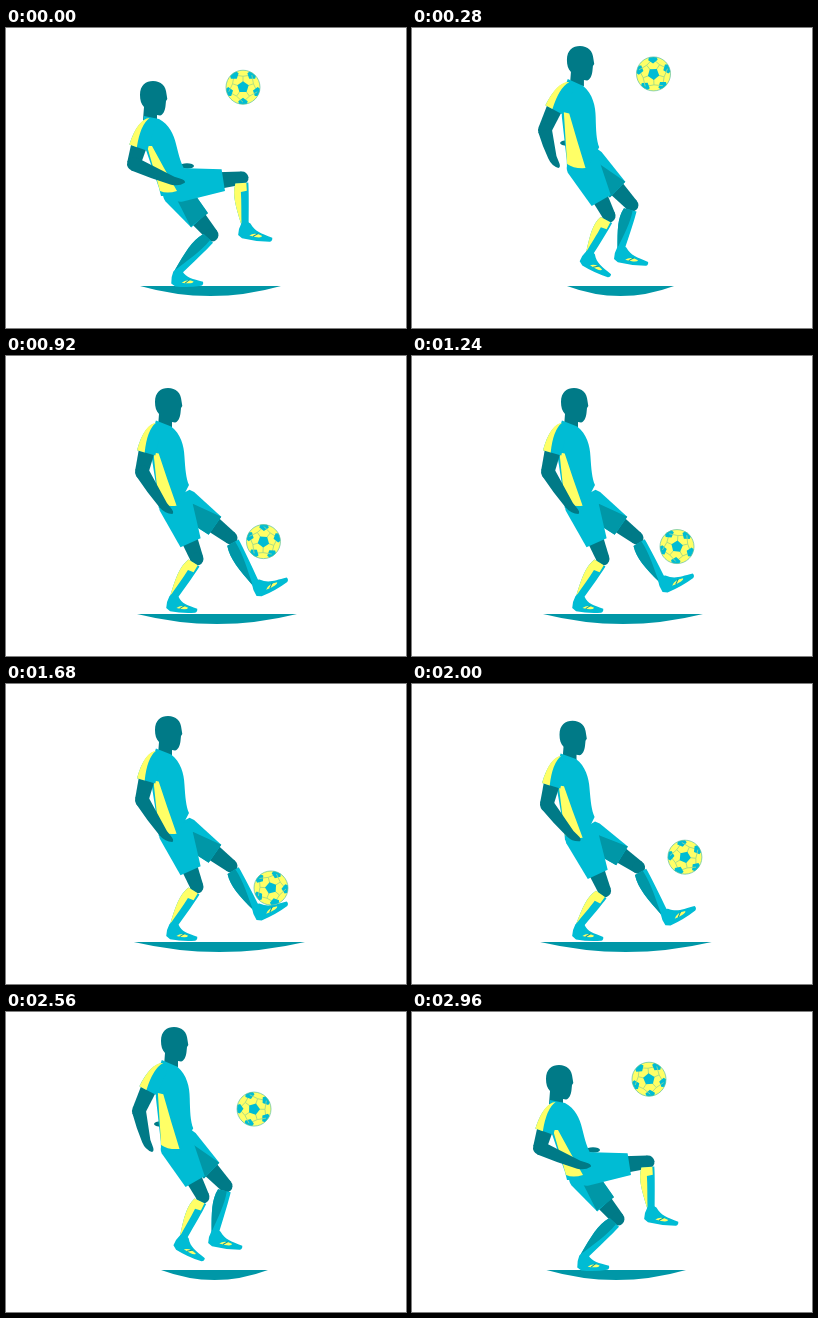
These frames come from a looping animation (400x300 px, 3 s). An HTML page with a canvas:

```html
<!DOCTYPE html>
<html lang="en">
<head>
<meta charset="utf-8">
<title>Juggling</title>
<style>
html, body { margin: 0; width: 100%; height: 100%; overflow: hidden; background: #fff; }
canvas { display: block; width: 400px; height: 300px; }
</style>
</head>
<body>
<canvas id="stage" width="400" height="300"></canvas>
<script>
const c = document.getElementById('stage').getContext('2d');
const LOOP = 3000, STEP = 40, G = 0.00095;
const SKIN = '#007a87', CYAN = '#00bcd4', DARK = '#0097a7', YELLOW = '#ffff66';

// Joints of each pose; limbs run hip, knee, ankle, toe.
const poses = {
  knee: {
    head: [147, 68], neck: [146, 90], hip: [168, 160], arm: [138, 102, 128, 136, 167, 152],
    near: [172, 157, 236, 150, 239, 197, 265, 212], far: [169, 163, 206, 207, 171, 245, 196, 256],
    hand: [181, 138], shadow: [134, 275], rim: [-1]
  },
  crouch: {
    head: [147, 67], neck: [146, 89], hip: [169, 160], arm: [138, 101, 128, 135, 167, 152],
    near: [170, 158, 206, 212, 166, 243, 190, 256], far: [178, 157, 239, 166, 240, 214, 270, 222],
    hand: [181, 138], shadow: [137, 270], rim: [1]
  },
  stand: {
    head: [162, 47], neck: [158, 68], hip: [168, 146], arm: [145, 79, 136, 116, 158, 149],
    near: [169, 147, 191, 203, 167, 242, 190, 255], far: [178, 146, 225, 182, 250, 224, 281, 220],
    hand: [162, 125], shadow: [131, 291], rim: [1]
  },
  kick: {
    head: [147, 68], neck: [145, 90], hip: [168, 160], arm: [137, 102, 125, 135, 166, 152],
    near: [171, 159, 207, 213, 166, 243, 190, 256], far: [179, 158, 241, 168, 276, 207, 301, 196],
    hand: [165, 138], shadow: [131, 306], rim: [1]
  },
  hop: {
    head: [168, 30], neck: [164, 52], hip: [171, 133], arm: [150, 62, 133, 99, 141, 129],
    near: [170, 132, 197, 185, 177, 226, 197, 248], far: [178, 129, 220, 174, 209, 221, 235, 236],
    hand: [155, 112], shadow: [155, 262], rim: [1]
  }
};

// time, pose, body lift, far foot drop, extra shadow width
const keys = [
  [0, 'knee', 0, 0, 0], [290, 'hop', -3, 0, 0], [560, 'crouch', 0, 0, 0],
  [774, 'stand', 0, 0, 0], [980, 'stand', 0, 5, 0], [1180, 'stand', 0, -1, 0],
  [1240, 'stand', 0, 0, 0], [1440, 'stand', 0, 5, 4], [1680, 'stand', 0, 0, 8],
  [1950, 'stand', -3, 6, 8], [2207, 'kick', 0, 15, 0], [2280, 'kick', 0, 0, 0],
  [2560, 'hop', 0, 0, 0], [2840, 'knee', 18, 0, -20], [2960, 'knee', 0, 0, -1], [3000, 'knee', 0, 0, 0]
];

const bounces = [[-150, 97], [774, 204], [1180, 203], [1680, 204], [2207, 205], [2850, 97], [3774, 204]];
const ballX = [[0, 237], [560, 246], [774, 254], [1240, 265], [1680, 265], [2207, 278],
  [2280, 277], [2560, 248], [2850, 238], [2960, 237], [3000, 237]];

const mix = (a, b, u) => a + (b - a) * u;

function span(list, t) {
  let i = 0;
  while (i < list.length - 2 && t >= list[i + 1][0]) i++;
  const a = list[i], b = list[i + 1];
  return [a, b, (t - a[0]) / (b[0] - a[0])];
}

function poseAt(t) {
  const [a, b, r] = span(keys, t), u = r * r * (3 - 2 * r);
  const p = {};
  for (const part in poses.knee) {
    p[part] = poses[a[1]][part].map((v, i) => mix(v, poses[b[1]][part][i], u));
  }
  const lift = mix(a[2], b[2], u), drop = mix(a[3], b[3], u), wide = mix(a[4], b[4], u);
  for (const part of ['head', 'neck', 'hip', 'arm', 'near', 'far', 'hand']) {
    // A low body only bends the knees: planted feet stay put.
    p[part] = p[part].map((v, i) => i % 2 && !(lift < 0 && i > 4) ? v - lift : v);
  }
  p.far[5] += drop;
  p.far[7] += drop;
  p.shadow[0] -= wide * 0.4;
  p.shadow[1] += wide;
  return p;
}

function fill(color, d) {
  c.fillStyle = color;
  c.fill(new Path2D(d));
}

function dot(color, x, y, rx, ry = rx) {
  c.fillStyle = color;
  c.beginPath();
  c.ellipse(x, y, rx, ry, 0, 0, 7);
  c.fill();
}

// Draws with the x axis running from the first point to the second.
function along(x1, y1, x2, y2, draw) {
  c.save();
  c.translate(x1, y1);
  c.rotate(Math.atan2(y2 - y1, x2 - x1));
  draw(Math.hypot(x2 - x1, y2 - y1));
  c.restore();
}

function leg([hx, hy, kx, ky, ax, ay, tx, ty], far, rim) {
  along(hx, hy, kx, ky, L => {
    fill(SKIN, `M${L * .5},-9L${L},-6.5L${L},6.5L${L * .5},9Z`);
    dot(SKIN, L, 0, 6.5);
  });
  along(kx, ky, ax, ay, L => {
    const back = `C${L * .35},11 ${L * .6},8 ${L},3.5`;
    fill(CYAN, `M5,7${back}L${L + 2},-3.5C${L * .6},-5 ${L * .3},-6 5,-6Z`);
    if (far) fill(DARK, `M5,7${back}C${L * .7},1 ${L * .4},-3 5,-2Z`);
    else fill(YELLOW, `M5,7${back}C${L * .75},3 ${L * .5},2 14,2L13,-4L5,-4Z`);
  });
  along(ax, ay, tx, ty, L => {
    fill(CYAN, `M-4,0L-2,-4L4,-4C${L * .4},1 ${L * .6},-1 ${L},-2.5Q${L + 2},0 ${L},2` +
      `Q${L * .6},9 4,13L-1,12Q-4,6 -4,0Z`);
    fill(YELLOW, `M${L * .3},7Q${L * .4},1 ${L * .68},1Q${L * .7},4 ${L * .3},7Z`);
    c.strokeStyle = DARK;
    c.lineWidth = 1;
    c.stroke(new Path2D(`M${L * .42},6L${L * .52},1`));
  });
  along(hx, hy, kx, ky, L => {
    const hem = L * (far ? .65 : .7), w = far ? 14 : 17;
    fill(CYAN, `M-3,${-w + 1}L2,${-w}L${hem},-11L${hem + 1},11L2,${w}Q-8,${w} -9,0Z`);
    if (far) {
      const s = rim < 0 ? -1 : 1;
      fill(DARK, `M8,${-4 * s}L${hem},${-11 * s}L${hem + 1},${11 * s}L4,${14 * s}Z`);
    }
  });
}

function head([x, y]) {
  c.save();
  c.translate(x, y);
  fill(SKIN, 'M-13,-1C-13,-11 -7,-15 0,-15C8,-15 13,-10 13.5,-2L14.3,3L13,5L12.5,10' +
    'C12,15 10,19 7,19.5L4,19L4,25L-10,24L-9,11C-12,8 -13,4 -13,-1Z');
  c.restore();
}

function torso([nx, ny], [hx, hy]) {
  const dx = hx - nx, dy = hy - ny, size = Math.hypot(dx, dy) / Math.hypot(22, 70);
  c.save();
  c.translate(nx, ny);
  c.rotate(Math.atan2(dy, dx) - Math.atan2(70, 22));
  c.scale(size, size);
  fill(CYAN, 'M-8,-2L7,1C17,6 22,17 24,26C27,38 29,46 33,52L25,78L9,78L7,70L-6,32L-10,12Z');
  fill(YELLOW, 'M-5,28L0,28L12,50L25,73Q15,76 8,73Z');
  c.restore();
}

function arm([sx, sy, ex, ey, wx, wy]) {
  along(sx, sy, ex, ey, L => {
    fill(SKIN, `M8,-8L${L},-6.5L${L},7L8,9Z`);
    dot(SKIN, L, 0, 7);
  });
  along(ex, ey, wx, wy, L => {
    fill(SKIN, `M0,-7L${L},-3.5L${L + 5},-4Q${L + 12},-5 ${L + 12},-2Q${L + 8},4 ${L},5Q${L * .5},7 0,7Z`);
  });
  along(sx, sy, ex, ey, () => {
    fill(CYAN, 'M-13,-3Q-9,9 18,10L19,-9L-6,-9Z');
    fill(YELLOW, 'M-13,-2Q-9,9 18,10L18.5,2Q-4,5 -13,-2Z');
  });
}

function pentagon(x, y, r, turn) {
  c.beginPath();
  for (let i = 0; i < 5; i++) {
    const a = turn + i * Math.PI * 0.4;
    c.lineTo(x + r * Math.cos(a), y + r * Math.sin(a));
  }
  c.closePath();
  c.fill();
}

function ball(t) {
  const [a, b, u] = span(bounces, t), T = b[0] - a[0];
  const y = mix(a[1], b[1], u) - G / 2 * T * T * u * (1 - u);
  const [p, q, v] = span(ballX, t);
  c.save();
  c.translate(mix(p[1], q[1], v), y);
  dot(YELLOW, 0, 0, 17);
  c.beginPath();
  c.arc(0, 0, 17, 0, 7);
  c.clip();
  c.rotate(t / LOOP * Math.PI * 2);
  c.fillStyle = DARK;
  c.strokeStyle = '#9fd98a';
  c.lineWidth = 0.8;
  for (let i = 0; i < 5; i++) {
    const k = i * Math.PI * 0.4 - Math.PI / 2, m = k + Math.PI / 5;
    const fx = 11 * Math.cos(k), fy = 11 * Math.sin(k);
    c.beginPath();
    c.moveTo(5 * Math.cos(k), 5 * Math.sin(k));
    c.lineTo(fx, fy);
    c.lineTo(15 * Math.cos(m), 15 * Math.sin(m));
    c.moveTo(fx, fy);
    c.lineTo(15 * Math.cos(k - Math.PI / 5), 15 * Math.sin(k - Math.PI / 5));
    c.stroke();
    c.fillStyle = CYAN;
    pentagon(15.5 * Math.cos(m), 15.5 * Math.sin(m), 5, m + Math.PI);
  }
  pentagon(0, 0, 6, -Math.PI / 2);
  c.restore();
  c.strokeStyle = '#59bfa5';
  c.lineWidth = 0.7;
  c.beginPath();
  c.arc(mix(p[1], q[1], v), y, 17, 0, 7);
  c.stroke();
}

function draw(t) {
  const p = poseAt(t), [l, r] = p.shadow;
  c.fillStyle = '#fff';
  c.fillRect(0, 0, 400, 300);
  fill(DARK, `M${l},258L${r},258Q${(l + r) / 2},278 ${l},258Z`);
  dot(SKIN, p.hand[0], p.hand[1], 7, 2.8);
  leg(p.far, true, p.rim[0]);
  head(p.head);
  leg(p.near, false);
  torso(p.neck, p.hip);
  arm(p.arm);
  ball(t);
}

const start = performance.now();
function tick() {
  const t = (performance.now() - start) % LOOP;
  draw(Math.floor(t / STEP) * STEP);
  requestAnimationFrame(tick);
}
tick();
</script>
</body>
</html>
```
